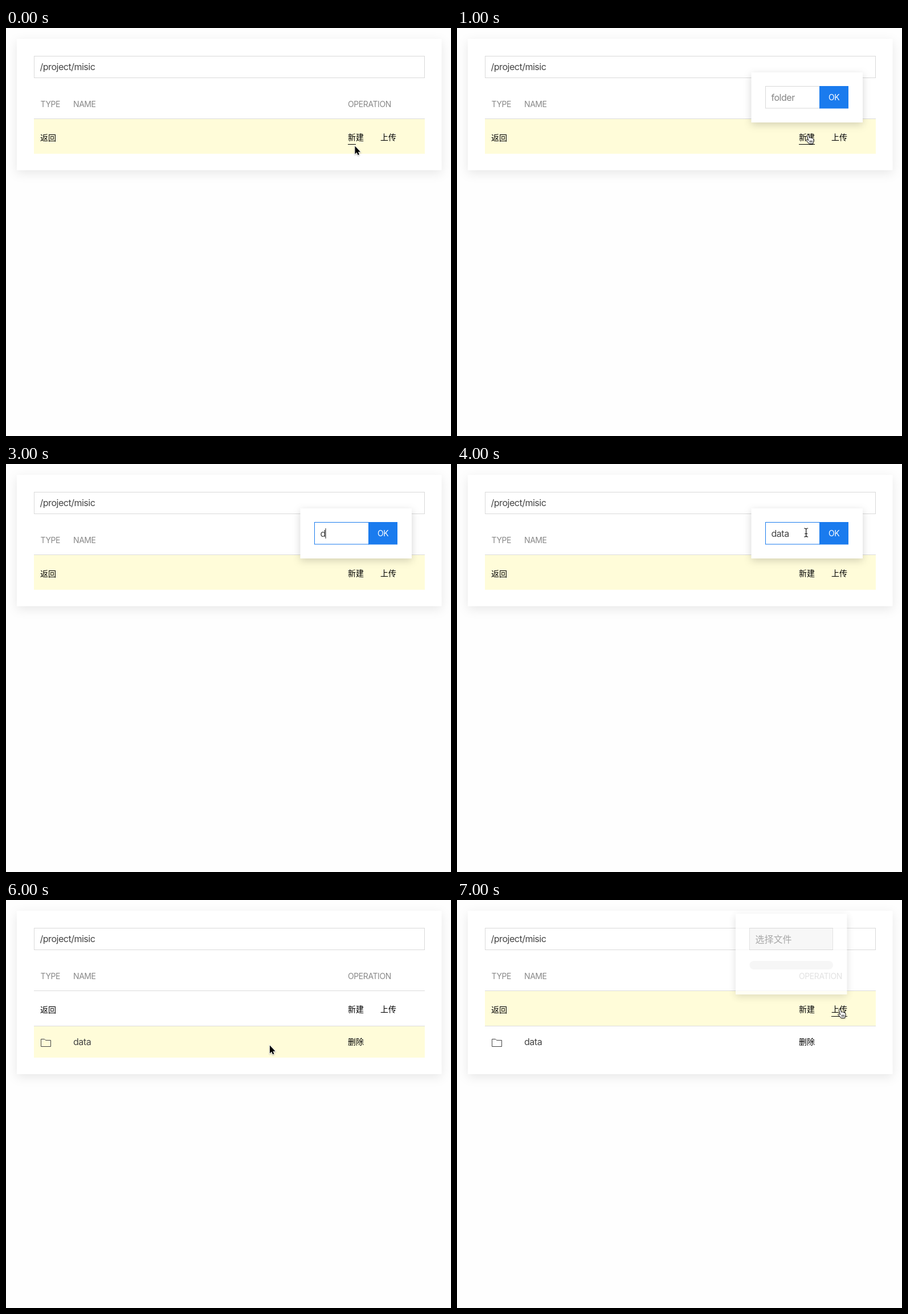
An HTML page for the animation above (8 s loop, 781 by 717 pixels).

```html
<!DOCTYPE html>
<html lang="zh-CN">
<head>
<meta charset="utf-8">
<title>File manager</title>
<style>
  html, body { margin: 0; width: 100%; height: 100%; overflow: hidden; background: #fefefe; }
  svg { display: block; }
  text { font: 14px Inter, "Noto Sans CJK SC", "Noto Sans CJK", sans-serif; fill: #000; }
  .latin { letter-spacing: -0.03em; }
  .big { font-size: 16px; fill: #444; }
  .head { fill: #888; }
  .hint { fill: #858585; }
  .line { fill: #dcdcdc; }
  .row { fill: #fffcd9; }
  .field { fill: #fff; stroke: #d9d9d9; }
  .card { fill: #fff; filter: drop-shadow(0 5px 9px rgba(0, 0, 0, .09)); }
  .popup { fill: #fff; filter: drop-shadow(0 4px 7px rgba(0, 0, 0, .17)); }
  .shade { filter: drop-shadow(0 1px 1px rgba(0, 0, 0, .3)); }
</style>
</head>
<body>
<svg width="781" height="717" viewBox="0 0 781 717">
  <rect id="card" class="card" x="19" y="19" width="745.5" height="231"/>
  <rect class="field" x="49.5" y="49.5" width="685" height="38"/>
  <text class="latin big" x="59.5" y="74">/project/misic</text>

  <text class="latin head" x="60.5" y="139">TYPE</text>
  <text class="latin head" x="118" y="139">NAME</text>
  <text class="latin head" x="600" y="139">OPERATION</text>

  <rect id="hover" class="row" x="49" width="686"/>
  <rect class="line" x="49" y="159" width="686" height="1"/>
  <text x="60" y="198">返回</text>
  <text x="600" y="197">新建</text>
  <text x="657" y="197">上传</text>
  <rect id="underline" y="204" height="1"/>

  <g id="entry">
    <rect class="line" x="49" y="221" width="686" height="1"/>
    <path d="M61.5 257.5V244.5H67.5L69.5 246.5H78.5V257.5Z" fill="none" stroke="#444"/>
    <text class="latin big" x="118" y="255">data</text>
    <text x="600" y="253.5">删除</text>
  </g>

  <g id="create">
    <rect class="popup" x="516.5" y="78" width="195.5" height="88"/>
    <rect id="nameBox" class="field" x="541.5" y="102.5" width="95" height="38.5"/>
    <rect x="636" y="102" width="51" height="39.5" fill="#1a7bee"/>
    <text class="latin" x="652" y="127" style="fill:#fff">OK</text>
    <text id="name" class="latin big" x="551.5" y="128"></text>
    <rect id="caret" x="560.5" y="113" width="1" height="18" fill="#222"/>
  </g>

  <g id="upload" opacity=".76">
    <rect class="popup" x="489" y="24" width="195.5" height="142"/>
    <rect x="513.5" y="49.5" width="146" height="38" fill="#f5f5f5" stroke="#d9d9d9"/>
    <text class="big" x="523.5" y="75" style="fill:#8c8c8c">选择文件</text>
    <rect x="513.5" y="107" width="146.5" height="15" rx="7.5" fill="#f4f4f4"/>
  </g>

  <g id="arrow" class="shade">
    <path d="M0 0V14L3.1 11.1 5.2 15.8 7.5 14.8 5.4 10.2H9.6Z" stroke="#fff" stroke-width="1.6" paint-order="stroke"/>
  </g>
  <g id="beam" fill="none" stroke-linecap="round">
    <path id="beamShape" d="M-3 -7.5Q0 -7.5 0 -5.5Q0 -7.5 3 -7.5M0 -5.5V5.5M-3 7.5Q0 7.5 0 5.5Q0 7.5 3 7.5M-2 2H2" stroke="#fff" stroke-width="2.6" stroke-opacity=".8"/>
    <use href="#beamShape" style="display:none"/>
    <path d="M-3 -7.5Q0 -7.5 0 -5.5Q0 -7.5 3 -7.5M0 -5.5V5.5M-3 7.5Q0 7.5 0 5.5Q0 7.5 3 7.5M-2 2H2" stroke="#111" stroke-width="1.2"/>
  </g>
  <g id="hand" class="shade" fill="#fff" stroke="#111" stroke-linejoin="round" stroke-linecap="round">
    <path d="M4.6 10.5L2.5 3Q2 .8 3.5 .6 4.8 .5 5.4 2.4L6.7 6.4Q7 5.2 8.3 5.4 9.4 5.6 9.6 6.7 10.2 5.7 11.3 6.2 12.2 6.6 12.3 7.6 13.5 7.2 13.9 8.8 14.4 11 13.4 13.3L12.7 16.4H6.2Q4.8 14 2.3 12.2 .2 10.5 1 9.5 2 8.5 3.4 9.6Z"/>
    <path d="M7.3 11V14M9.2 11V14M11.1 11V14" stroke-width=".9"/>
  </g>
</svg>
<script>
  const $ = id => document.getElementById(id);
  const show = (id, on) => { $(id).style.display = on ? "" : "none"; };
  const set = (id, attrs) => {
    for (const key in attrs) $(id).setAttribute(key, attrs[key]);
  };

  // One entry per second; pointer is [kind, x, y], underline is [x, width].
  const scenes = [
    { row: 1, underline: [600, 14], pointer: ["arrow", 612.5, 207.5] },
    { row: 1, underline: [600, 28], pointer: ["hand", 612, 187], name: "" },
    { row: 1, pointer: ["beam", 590, 123.5], name: "", focus: true },
    { row: 1, name: "d", focus: true, caret: true },
    { row: 1, pointer: ["beam", 612.7, 120.5], name: "data", focus: true },
    { entry: true, pointer: ["arrow", 630, 155] },
    { row: 2, entry: true, pointer: ["arrow", 463, 255.5] },
    { row: 1, entry: true, underline: [657, 28], pointer: ["hand", 668, 191], upload: true }
  ];

  function draw(scene) {
    const { row, underline, pointer, name, entry } = scene;
    set("card", { height: entry ? 287 : 231 });
    show("hover", row);
    set("hover", row === 2 ? { y: 221, height: 56 } : { y: 160, height: 61 });
    show("underline", underline);
    if (underline) set("underline", { x: underline[0], width: underline[1] });
    show("entry", entry);
    show("upload", scene.upload);

    show("create", name !== undefined);
    $("name").textContent = name || "folder";
    $("name").style.fill = name ? "#444" : "#858585";
    $("nameBox").style.stroke = scene.focus ? "#1a7bee" : "#d9d9d9";
    show("caret", scene.caret);

    for (const kind of ["arrow", "beam", "hand"]) show(kind, pointer && pointer[0] === kind);
    if (pointer) set(pointer[0], { transform: `translate(${pointer[1]} ${pointer[2]})` });
  }

  let start, current;
  function tick(now) {
    start ??= now;
    const scene = scenes[Math.floor((now - start) / 1000) % scenes.length];
    if (scene !== current) draw(current = scene);
    requestAnimationFrame(tick);
  }
  draw(current = scenes[0]);
  requestAnimationFrame(tick);
</script>
</body>
</html>
```
